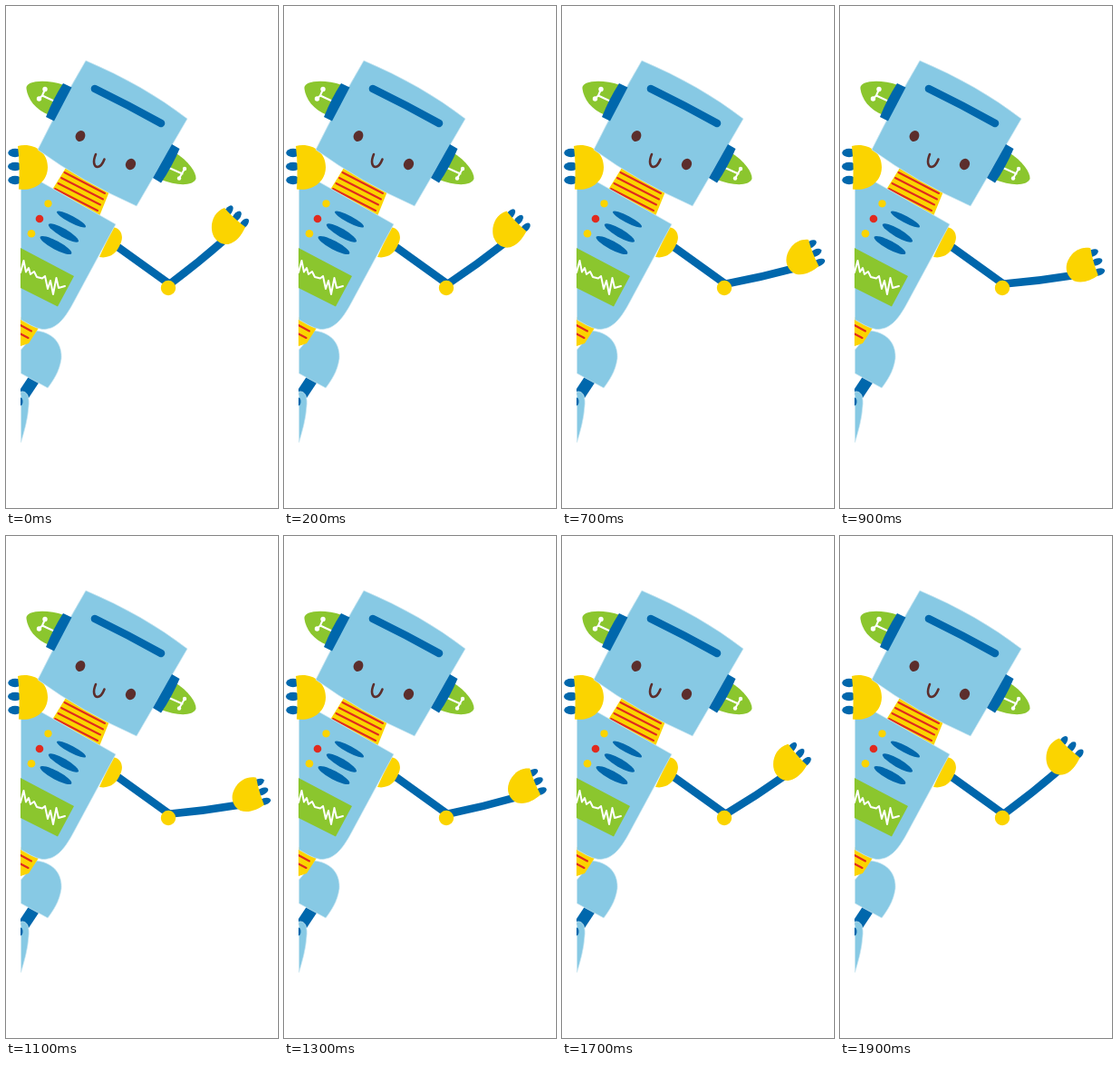
These frames come from a looping animation (300 by 552 pixels, 2 s). An HTML page:

```html
<!DOCTYPE html>
<html lang="en">
<head>
<meta charset="utf-8">
<title>Waving robot</title>
<style>
  html, body { margin: 0; width: 100%; height: 100%; overflow: hidden; background: #fff; }
  svg { display: block; width: 100%; height: 100%; }
  .sky { fill: #87c9e4; stroke: #cfe8f2; stroke-width: .7; }
  .navy { fill: #0067ac; }
  .sun { fill: #fbd400; }
  .leaf { fill: #8bc62e; }
  .red { fill: #e12a1e; }
  .brown { fill: #5c2e2c; }
  .line { fill: none; stroke-linecap: round; stroke-linejoin: round; }
  .limb { stroke: #0067ac; stroke-width: 8.6; }
  .stripe { stroke: #e12a1e; stroke-width: 2; }
  .white { stroke: #fff; stroke-width: 2; }
  .dot { fill: #fff; }
</style>
</head>
<body>
<svg viewBox="0 0 300 552">
  <defs>
    <clipPath id="wall"><path d="M16 0H300V552H16Z"/></clipPath>
  </defs>

  <!-- waving arm -->
  <path class="line limb" d="M122 264L180 305.5"/>
  <g id="forearm">
    <path class="line limb" d="M181 305.500Q212.500 282 241 257"/>
    <g class="navy">
      <ellipse rx="7" ry="3.8" transform="translate(245.500 225.500) rotate(-55)"/>
      <ellipse rx="7" ry="3.8" transform="translate(254.500 231.500) rotate(-53)"/>
      <ellipse rx="7" ry="3.8" transform="translate(262.500 239.500) rotate(-48)"/>
    </g>
    <path class="sun" d="M241 222C230 226 226 237 227 246C228 257 237 263 245 262C254 260 260 252 264 243C256 237 248 230 241 222Z"/>
  </g>
  <circle class="sun" cx="179" cy="310" r="8.200"/>
  <path class="sun" d="M118 243C128 245 130 254 126 262C122 272 114 278 103 276Z"/>

  <g clip-path="url(#wall)">
    <!-- leg -->
    <path class="navy" d="M26 406L37 413L25 431L16 428V421Z"/>
    <path class="sky" d="M16.500 424C24 423 26 431 25 440C24 455 20 468 16.500 480Z"/>
    <ellipse class="navy" cx="15.500" cy="435" rx="3" ry="4.500"/>
    <path class="sky" d="M34 357C55 360 62 374 61 388C59 402 52 412 46 420L16.500 404V378Z"/>
    <path class="sun" d="M16 342L36 354L25 371L16 374Z"/>
    <path class="line stripe" d="M16 351L28 357.500M16 360.500L24.500 365"/>

    <!-- neck and torso -->
    <path class="sun" d="M66 178L114 204L103 231L51 202Z"/>
    <path class="line stripe" d="M64.500 183L109 206M61 189L107 212.500M57.500 195L104 218.500M54 201L101 225"/>
    <path class="sky" d="M16.500 181L45 197L121 240L75 325C63 348 53 356 40 355.500C31 354 24 349 16.500 345Z"/>
    <circle class="sun" cx="46.500" cy="217.300" r="4.100"/>
    <circle class="red" cx="37" cy="234" r="4.300"/>
    <circle class="sun" cx="28" cy="250.300" r="4.300"/>
    <g class="navy">
      <ellipse rx="18" ry="3.800" transform="translate(72 234.500) rotate(28)"/>
      <ellipse rx="19" ry="4.600" transform="translate(63.500 249.500) rotate(30)"/>
      <ellipse rx="19.500" ry="4.700" transform="translate(55 263) rotate(28)"/>
    </g>
    <path class="leaf" d="M16 266L75 297L57 330.500L16 310Z"/>
    <path class="line white" d="M16 293L19.500 280L22 292.500L25 288L27 295L31 292L34 298L40 299.500L43 297L46 311L49 302L52 317L55.500 299L58 310L65 308"/>
  </g>

  <!-- hand holding the wall -->
  <g class="navy">
    <ellipse cx="10" cy="161.500" rx="7.700" ry="4.700"/>
    <ellipse cx="10" cy="176.500" rx="8" ry="4.700"/>
    <ellipse cx="10" cy="191.500" rx="7.700" ry="4.700"/>
  </g>
  <path class="sun" d="M13 154C30 150 46 160 46 177C46 193 32 204 14 201.500C15 185 15 170 13 154Z"/>

  <!-- ears -->
  <path class="leaf" d="M64 87C44 80 21 82 22.500 91C24 102 32 114 48 120Z"/>
  <path class="leaf" d="M186 161C201 170 210 183 209.500 190C206 199 186 197 171 191Z"/>
  <path class="line white" d="M43 91.500L40 98.500L36.500 102M40 98.500L54 105M180 178L194.500 184.500M197 179L191 189.500"/>
  <g class="dot">
    <circle cx="43" cy="91.500" r="2.700"/>
    <circle cx="36.500" cy="102" r="2.700"/>
    <circle cx="197" cy="179" r="2.200"/>
    <circle cx="191" cy="189.500" r="2.200"/>
  </g>

  <!-- head -->
  <path class="sky" d="M88 60Q152 87 200 124L144 220Q85 194 35 158Q60 107 88 60Z"/>
  <path class="navy" d="M63 85L72.500 89.500L53 126.500L44 122Q52 102 63 85Z"/>
  <path class="navy" d="M183 152L191.500 157Q183 177 171 194.500L162 189Z"/>
  <path class="line limb" d="M98 91Q136 109.500 171 129"/>
  <g class="brown">
    <ellipse rx="5.200" ry="6.100" transform="translate(82 143) rotate(28)"/>
    <ellipse rx="5.500" ry="6.300" transform="translate(137.500 174) rotate(28)"/>
  </g>
  <path class="line" stroke="#5c2e2c" stroke-width="2.600" d="M99 163C95.500 171 97 177 101 177C105 176.500 107 172.500 108.500 168.500"/>
</svg>
<script>
  const LOOP = 2000, STEP = 100, SWING = 32.5, PERIOD = 1980;
  const forearm = document.getElementById("forearm");

  function draw(now) {
    const time = Math.floor((now % LOOP) / STEP) * STEP;
    const angle = SWING * (1 - Math.cos(2 * Math.PI * time / PERIOD)) / 2;
    forearm.setAttribute("transform", `rotate(${angle} 181 306)`);
    requestAnimationFrame(draw);
  }
  draw(performance.now());
</script>
</body>
</html>
```
